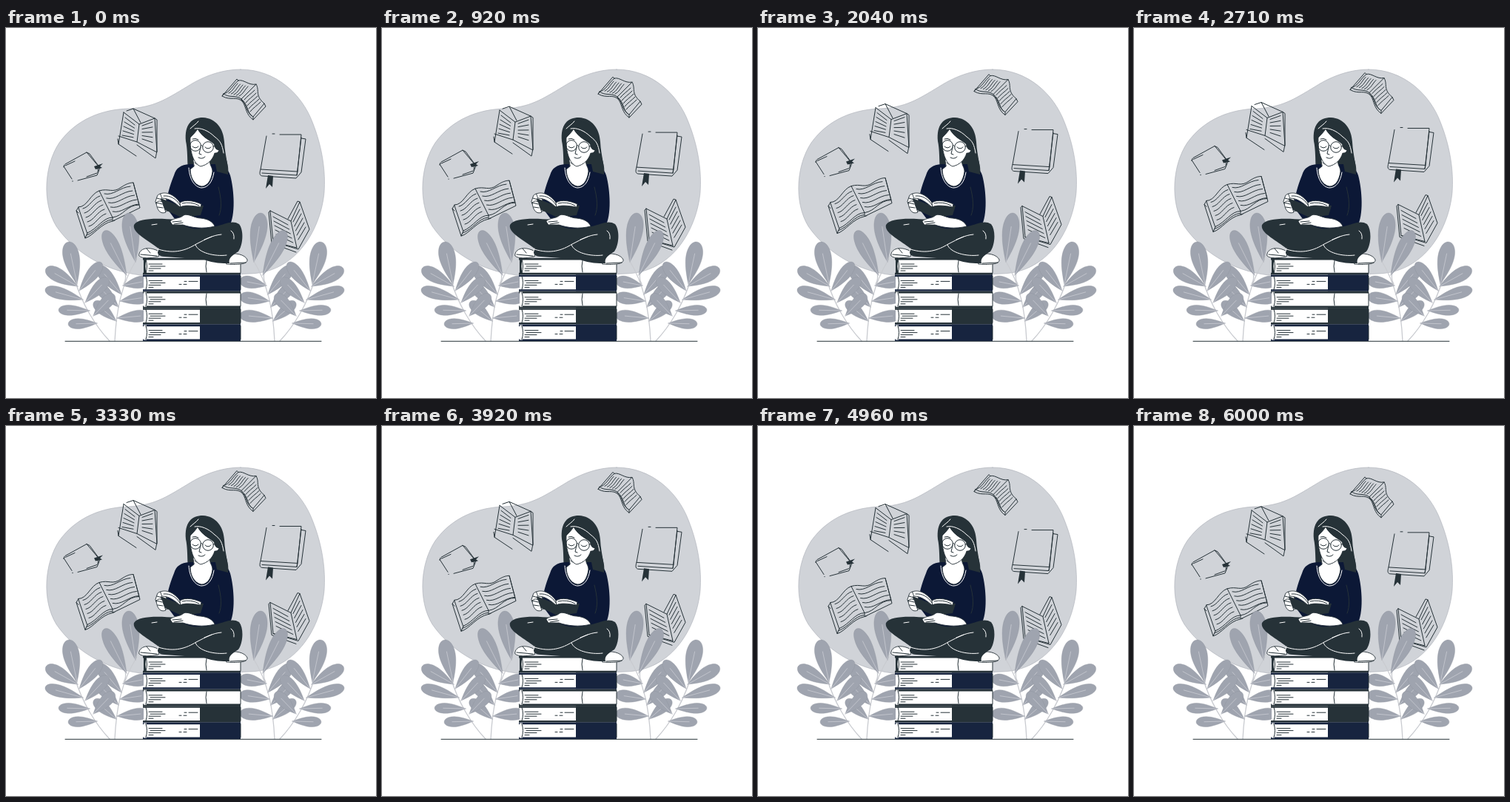
An HTML page for the animation above (6.04 s loop, 500x500 px).

```html
<!DOCTYPE html>
<html lang="en">
<head>
<meta charset="utf-8">
<title>Reading</title>
<style>
html, body { margin: 0; width: 100%; height: 100%; overflow: hidden; background: #fff }
svg { display: block; width: 100%; height: 100% }
path { stroke-linecap: round; stroke-linejoin: round }
.line { fill: none; stroke: #263238; stroke-width: 1 }
.white { fill: #fff; stroke: #263238; stroke-width: .9 }
.shine { fill: none; stroke: #fff; stroke-width: 1 }
.dark { fill: #263238 }
.navy { fill: #0c1836 }
.leaf { fill: #9fa4af; stroke: #8d929d; stroke-width: .4 }
.vein { fill: none; stroke: #c4c7ce; stroke-width: .9 }
.stem { fill: none; stroke: #c9cbd0; stroke-width: 1.3 }
</style>
</head>
<body>
<svg viewBox="0 0 500 500">
  <path fill="#d0d3d8" stroke="#a9adb5" stroke-width=".6" d="M317 56C365 56 400 90 414 127C428 162 432 195 430 222C426 268 395 330 330 332C280 334 230 337 182 334C130 328 90 300 68 268C48 235 52 185 72 155C95 123 130 110 165 109C200 107 215 97 245 79C270 63 295 56 317 56Z"/>

  <g id="books">
    <!-- small closed book -->
    <path class="line" d="M80 184L109 168L125 187L124 195M78 187L89 204M79 185L78 188M109 168L113 170L127 189L123 199L97 206M80 186L93 180M123 196L109 201"/>
    <path class="dark" d="M119 187L131 183L127 187L130 189L121 191Z"/>
    <circle class="dark" cx="90" cy="207" r=".7"/>
    <!-- standing open books -->
    <path class="line" d="M159 114L152 157L176 173M159 114L180 130L177 154L152 146M163 112L172 109L201 122L204 168L177 154M172 109L182 128M180 130L201 122M201 122L204 124V166L202 176L177 158M152 157L151 150"/>
    <path class="line" d="M357 247L361 289L395 299L410 272L397 235L385 261L357 247M357 247L355 249L359 291L392 303M385 261L393 297M397 235L394 234L381 258M361 289L393 297"/>
    <g id="rules"></g>
    <!-- wide open books -->
    <path class="line" d="M98 242C110 242 114 224 126 220C139 216 144 224 156 215C162 211 167 209 172 209L180 239C163 239 159 254 144 256C131 256 124 271 110 277Z M126 220L144 256M98 242L95 247L107 284C118 281 128 264 144 261L181 243L172 209M107 284L110 277M95 247L98 250M144 256V261L147 260M109 280C123 275 130 260 143 259"/>
    <path class="line" d="M294 89C303 87 306 77 314 71C321 69 328 78 338 76C343 85 336 91 349 102L334 120C325 115 328 104 318 96C310 90 302 95 294 89ZM338 76L318 96M314 71L312 69L292 92C304 99 312 91 320 100C325 108 324 117 334 124L351 106L349 102M334 120V124M292 92L294 89"/>
    <path class="line" stroke-width="2" d="M318 97C326 103 323 111 332 119"/>
    <!-- closed book with ribbon -->
    <path class="line" d="M370 144L399 144L394 194L344 191L352 146M360 143H363M344 191C342 197 343 200 347 200L392 203L399 195L405 150L399 149M346 196L393 199L399 148M394 194L393 199"/>
    <path class="dark" d="M354 199L361 200L360 215L356 211L351 217Z"/>
  </g>

  <g id="plant"></g>
  <use href="#plant" transform="matrix(-1 0 0 1 510 0)"/>
  <path class="line" d="M80 423.3H426"/>
  <g id="stack"></g>

  <!-- reader -->
  <path class="dark" d="M243 153C241 130 251 121 266 121C284 122 294 136 295 154C296 174 302 188 300 207L250 204C243 194 247 172 243 153Z"/>
  <path class="navy" d="M248 184C236 185 230 189 227 199C221 214 217 228 216 242L231 262C235 276 240 282 260 284L300 271C310 258 309 225 304 203C302 192 297 188 284 184Z"/>
  <path class="dark" d="M279 165L294 160C296 176 302 185 300 198L285 194Z"/>
  <path class="white" d="M253 178L275 177C275 186 279 188 279 194C277 208 271 214 264 214C254 212 249 201 249 191L254 187Z"/>
  <path class="shine" d="M247 189C248 205 255 215 264 216C273 216 279 208 281 195"/>
  <path class="line" d="M255 182C262 188 269 186 274 180"/>
  <path class="white" d="M249 148C253 144 257 140 259 136C266 149 278 154 288 156C290 164 287 170 282 169C279 179 272 185 263 187C254 184 248 168 249 148Z"/>
  <path class="dark" d="M257 132C261 146 276 152 281 157C282 165 287 167 294 164C295 140 282 126 262 125Z"/>
  <path class="shine" d="M255 136C263 134 274 139 282 147C290 153 292 157 294 169M249 136C253 132 257 130 260 126"/>
  <g class="line">
    <circle cx="256" cy="159" r="7.3"/>
    <circle cx="273" cy="161" r="7.3"/>
    <path d="M263 159Q264 157 266 160M252 160Q256 164 260 160M269 161Q273 165 277 161M252 150Q256 148 260 151M263 161L261 170L264 171M260 175Q265 178 269 174M280 160L286 159"/>
  </g>
  <path class="line" d="M287 215C291 230 292 244 288 253"/>

  <path class="white" d="M180 305C182 297 194 295 207 302L206 309C195 311 184 312 180 308Z"/>
  <path class="white" d="M299 306C309 303 323 306 326 313C327 320 311 320 298 319Z"/>
  <path class="dark" d="M230 259C207 257 179 256 173 266C170 277 193 287 206 298C203 305 206 309 215 309L268 313C281 318 292 318 302 318C300 311 306 307 314 302C320 294 322 274 315 265C306 259 296 265 284 268C264 273 243 274 230 259Z"/>
  <path class="shine" d="M206 299C228 306 244 300 257 292C271 285 279 280 291 279M206 298L204 305M256 293C260 304 282 309 298 307M304 274Q309 277 308 285M197 266L204 265M268 286L278 282"/>
  <path class="line" d="M182 306L204 308M303 318L324 317M190 298L195 304"/>

  <path class="white" d="M205 226C209 222 214 224 216 229L219 247C212 249 204 243 202 235Z"/>
  <path class="dark" d="M209 230L234 240L267 240L263 253L237 256L211 244Z"/>
  <path class="white" d="M209 224C217 220 229 227 235 236C243 231 255 234 264 238L263 242C251 240 242 239 235 242C227 235 220 230 211 230Z"/>
  <path class="line" d="M235 236L237 256M213 227C222 226 230 231 235 239M238 237Q250 234 261 240"/>
  <path class="white" d="M203 236C207 232 212 234 212 238L216 249C209 252 204 247 203 236Z"/>
  <path class="line" d="M204 230L211 232M203 236L211 238M205 242L212 243"/>
  <path class="white" d="M222 261C227 256 235 258 240 253C246 250 255 257 263 257C273 258 280 262 282 268C266 272 251 270 239 266L225 266Z"/>
  <path class="line" d="M225 262L237 261M227 265L239 263"/>
</svg>
<script>
const $ = id => document.getElementById(id);
const path = (cls, d) => `<path class="${cls}" d="${d}"/>`;

// Teardrop leaf: narrow at the base, round at the tip.
function leaf(x, y, tx, ty, w) {
  const dx = tx - x, dy = ty - y, len = Math.hypot(dx, dy);
  const at = (u, v) => `${(x + dx * u - dy / len * v).toFixed(1)} ${(y + dy * u + dx / len * v).toFixed(1)}`;
  return path('leaf', `M${at(0, 0)}C${at(.25, w * .35)} ${at(.6, w * .75)} ${at(.84, w * .5)}C${at(1.05, w * .3)} ${at(1.05, -w * .3)} ${at(.84, -w * .5)}C${at(.6, -w * .75)} ${at(.25, -w * .35)} ${at(0, 0)}Z`)
    + path('vein', `M${at(0, 0)}L${at(.72, 0)}`);
}

const innerLeaves = [
  [175, 316, 165, 250, 19], [163, 334, 133, 274, 17],
  [156, 360, 124, 322, 15], [152, 377, 122, 346, 14], [149, 396, 119, 370, 13],
  [158, 348, 194, 341, 14], [154, 369, 194, 363, 14], [150, 392, 194, 388, 14]
];
const outerLeaves = [
  [96, 346, 84, 289, 19], [97, 349, 54, 325, 16], [104, 367, 53, 353, 14],
  [113, 382, 71, 381, 12], [123, 399, 84, 400, 12],
  [99, 355, 129, 317, 14], [107, 371, 138, 338, 14], [118, 389, 146, 360, 14]
];
$('plant').innerHTML =
  path('stem', 'M147 423C149 383 155 347 177 312M159 346Q163 339 161 331') +
  innerLeaves.map(l => leaf(...l)).join('') +
  path('stem', 'M140 423C121 403 102 372 93 340') +
  outerLeaves.map(l => leaf(...l)).join('');

const colors = ['', '#17243f', '', '#263238', '#17243f'];
$('stack').innerHTML = colors.map((color, i) => {
  const y = 311 + i * 22.4;
  const spine = color
    ? `<rect x="262" y="${y}" width="55" height="22.4" fill="${color}"/>`
    : path('line', `M271 ${y + 3}Q269 ${y + 11} 271 ${y + 19}`);
  const cover = color || '#263238';
  let d = '';
  for (const [x1, x2, dy] of [[193, 211, 8], [195, 215, 11], [193, 209, 14], [193, 199, 17]]) d += `M${x1} ${y + dy}H${x2}`;
  if (color) d += `M241 ${y + 9}H244M247 ${y + 9}H259M234 ${y + 13}H237M240 ${y + 13}H244`;
  return `<rect x="186" y="${y}" width="131" height="22.4" fill="#fff"/>${spine}
    <path d="M185 ${y + 1.3}H317M185 ${y + 21.1}H317" stroke="${cover}" stroke-width="2.6" style="stroke-linecap:butt"/>
    ${i % 2 ? '' : `<path d="M186 ${y + 1}H190Q187 ${y + 11} 190 ${y + 21}H186Z" fill="${i ? '#fff' : cover}"/>`}
    ${path('line', `M189 ${y + 2}Q192 ${y + 11} 189 ${y + 20}M317 ${y + 2}V${y + 20}`)}${path('line', d)}`;
}).join('');

// Text rules on the open pages.
let rules = '';
for (let i = 0; i < 5; i++) {
  const k = i * 6;
  rules += `M${161 - i} ${121 + k}L${174 - i * .5} ${131 + k * .7}M184 ${132 + k * .75}L198 ${127 + k * 1.15}`;
  rules += `M${361 + i} ${255 + k}L${381 + i * 1.7} ${266 + k}M${388 + i * 1.7} ${262 + k}L${397 + i * 2} ${245 + k}`;
  const u = i * 6;
  rules += `M${104 + i * 2} ${244 + u}c9-2 13-14 23-17M${133 + i * 2.8} ${224 + u}c12 3 21-9 35-10`;
  const v = i * 3.5;
  rules += `M${301 + v} ${88 + i}c6-3 7-8 12-13M${322 + i * 2} ${97 + i * 4}c4-5 9-8 14-13`;
}
$('rules').innerHTML = path('line', rules);

const period = 6040, lift = 9.5;
function draw(now) {
  const phase = now % period / period;
  $('books').setAttribute('transform', `translate(0 ${-lift * (1 - Math.abs(1 - 2 * phase))})`);
  requestAnimationFrame(draw);
}
draw(performance.now());
</script>
</body>
</html>
```
